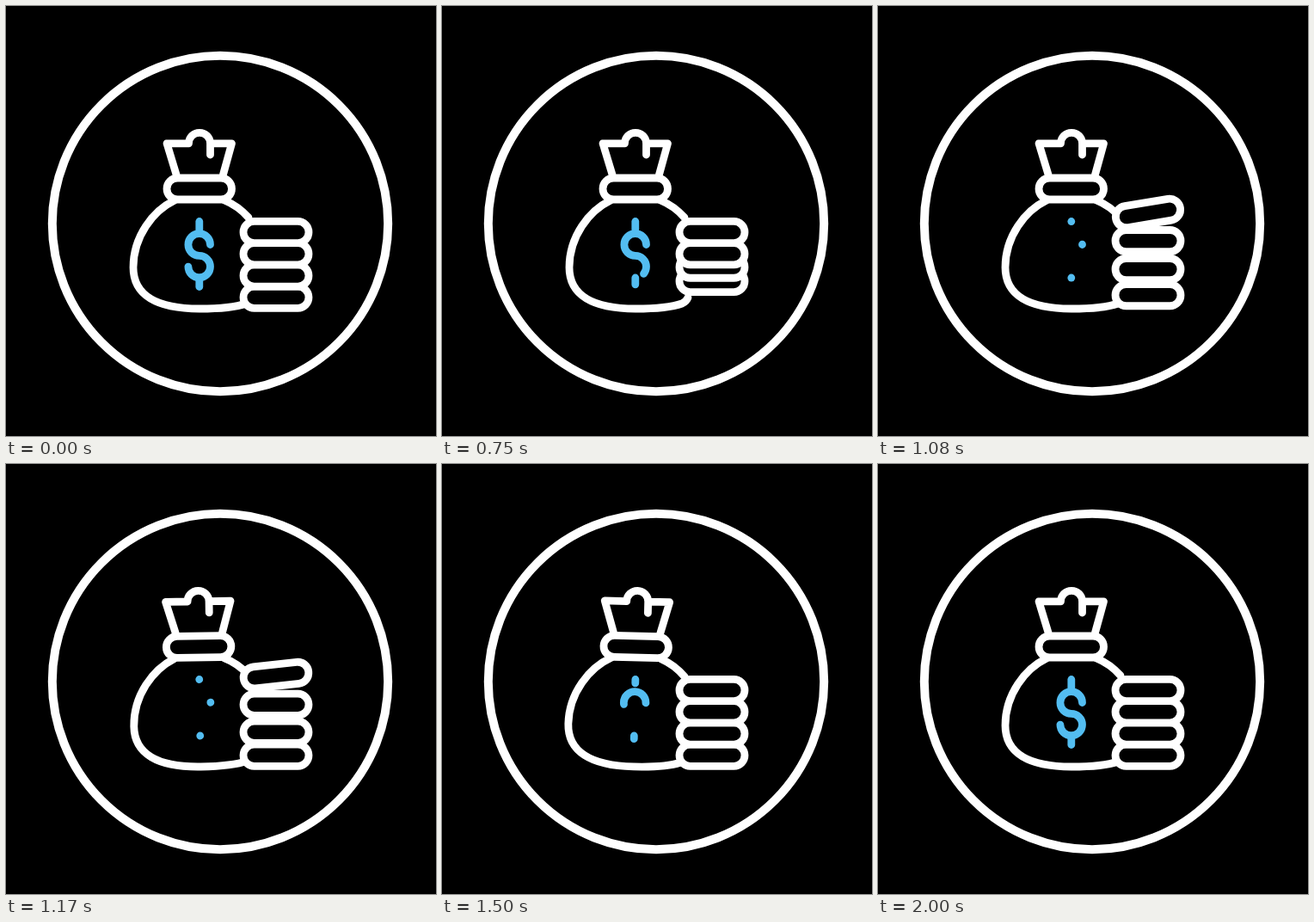
Animation of 500 by 500 pixels, one loop 3010 ms. Source, as an HTML page:

```html
<!DOCTYPE html>
<html lang="en">
<head>
<meta charset="utf-8">
<title>Money bag and coins</title>
<style>
  html, body { margin: 0; width: 100%; height: 100%; overflow: hidden; background: #000; }
  svg { display: block; width: 100%; height: 100%; }
  svg * { stroke-linecap: round; stroke-linejoin: round; }
</style>
</head>
<body>
<svg viewBox="0 0 500 500" fill="none" stroke="#fff" stroke-width="8.8">
  <circle cx="249" cy="253" r="195.2" stroke-width="10"/>
  <g id="bag">
    <path d="M198 196L187 159.8H212.5A12.5 12.5 0 0 1 237.5 159.8V173M237.5 159.8H262.5L252.5 196"/>
    <rect x="187" y="200" width="75.5" height="25" rx="12.5"/>
    <path d="M196 226C171 238 148 268 148 304C148 336 175 352 225 352C248 352 268 350 279 346C283 344 285 342 286 339M254 226C264 230 274 237 282 246"/>
    <g id="dollar" stroke="#53bdf1">
      <path pathLength="1" d="M224.8 250.5V263"/>
      <path pathLength="1" d="M237.5 277.5A12.8 12.8 0 1 0 224.7 290.3A12.8 12.8 0 1 1 211.9 303.1"/>
      <path pathLength="1" d="M224.8 316V326.5"/>
    </g>
  </g>
  <g id="coins" fill="#000"></g>
</svg>
<script>
const LOOP = 3010, START = 577, STEP = 83.5, LAST_STEP = 17;
const bag = document.getElementById('bag');
const strokes = document.querySelectorAll('#dollar path');

// Bottom coin first, so that higher coins overlap lower ones.
const coins = [
  { y: 338.8, delay: 0, height: 21, fall: 4.5 },
  { y: 313.5, delay: 0.8, height: 21, fall: 4.5 },
  { y: 288.3, delay: 2, height: 20.5, fall: 4.5 },
  { y: 263, delay: 2.9, height: 23, fall: 5, tilt: -9.5 }
];
for (const coin of coins) {
  coin.node = document.createElementNS('http://www.w3.org/2000/svg', 'rect');
  const box = { x: -38, y: -12.6, width: 76, height: 25.2, rx: 12.6 };
  for (const name in box) coin.node.setAttribute(name, box[name]);
  document.getElementById('coins').append(coin.node);
}

function ease(from, to, x) {
  const u = Math.min(1, Math.max(0, (x - from) / (to - from)));
  return u * u * (3 - 2 * u);
}

const hump = (start, peak, end, x) => ease(start, peak, x) - ease(peak, end, x);

function draw(time) {
  const step = Math.min(LAST_STEP, Math.max(0, Math.floor((time - START) / STEP)));

  for (const { node, y, delay, height, fall, tilt = 0 } of coins) {
    const peak = delay + 2.5;
    const lift = height * hump(delay, peak, peak + fall, step);
    const angle = tilt * hump(4.2, 6, 8.5, step);
    node.setAttribute('transform', `translate(314 ${y - lift}) rotate(${angle})`);
  }

  const lean = -3.4 * ease(6, 9, step) + 6.4 * ease(9, 12, step) - 3 * ease(12, 17, step);
  bag.setAttribute('transform', `rotate(${lean} 225 254)`);

  const shown = 1 - ease(0, 6, step) + ease(7, 17, step);
  const dash = shown >= 1 ? 'none' : `${Math.max(0.002, shown)} 2`;
  for (const stroke of strokes) stroke.setAttribute('stroke-dasharray', dash);
}

const origin = performance.now();
function tick() {
  draw((performance.now() - origin) % LOOP);
  requestAnimationFrame(tick);
}
tick();
</script>
</body>
</html>
```
